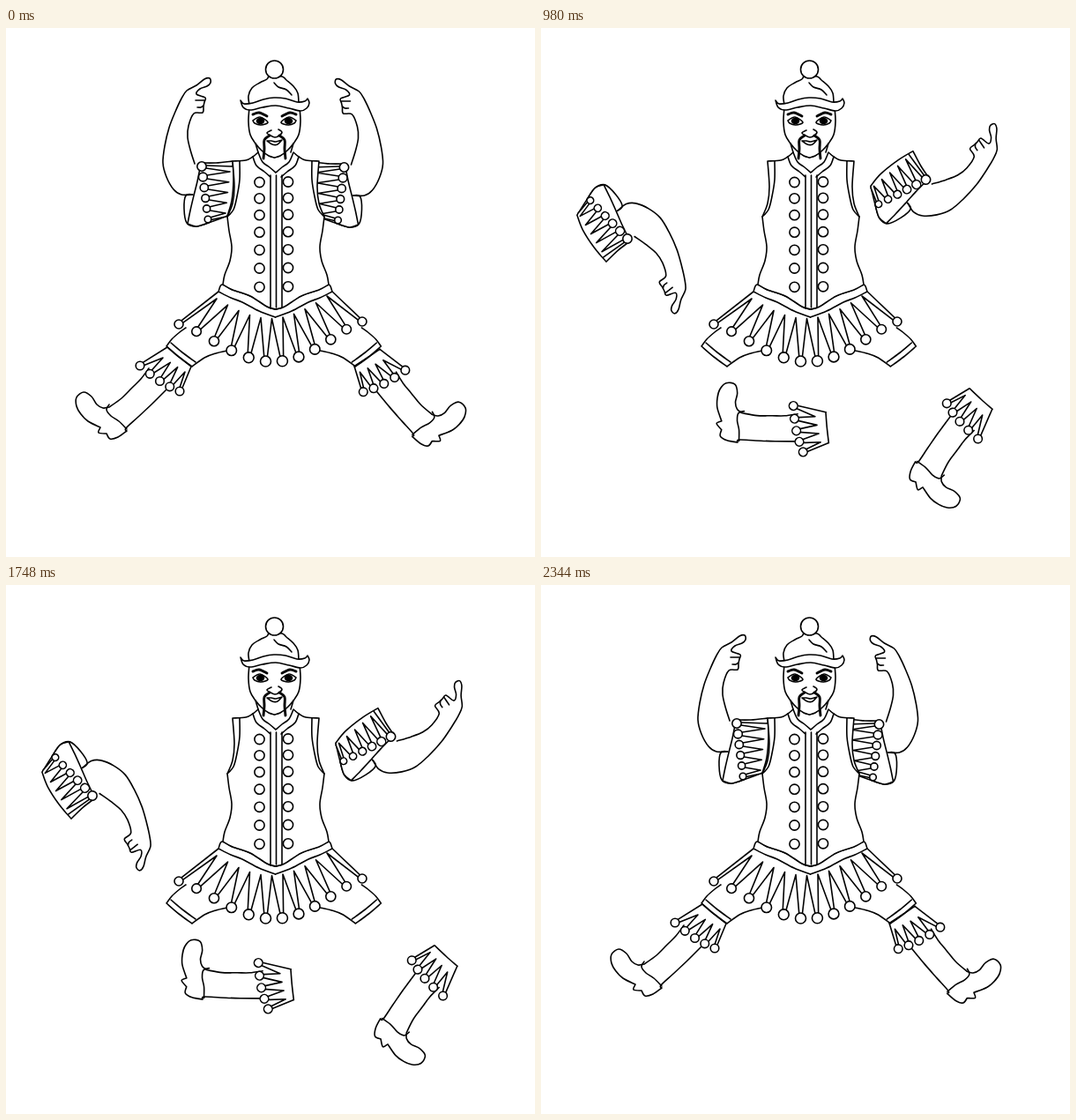
An HTML page that plays this animation: 600x600 px, repeating every 2.4 s.

```html
<!DOCTYPE html>
<html lang="en">
<head>
<meta charset="utf-8">
<title>Jumping jack</title>
<style>
html, body { margin: 0; width: 100%; height: 100%; overflow: hidden; background: #fff; }
svg { display: block; width: 100%; height: 100%; }
g { fill: none; stroke: #000; stroke-width: 1.6; stroke-linecap: round; stroke-linejoin: round; }
.white { fill: #fff; }
.ink { fill: #000; }
.bold { stroke-width: 2.9; }
</style>
</head>
<body>
<svg id="stage" viewBox="0 0 600 600"></svg>
<script>
const LOOP = 2400, APART = 980, TOGETHER = 2260;
const stage = document.getElementById('stage');

function add(parent, tag, attrs = {}) {
  const el = document.createElementNS('http://www.w3.org/2000/svg', tag);
  for (const k in attrs) el.setAttribute(k, attrs[k]);
  parent.appendChild(el);
  return el;
}

const points = s => s.trim().split(/\s+/).map(p => p.split(',').map(Number));

// Smooth path through points; "|" marks a corner.
function curve(text) {
  let d = '', last = null;
  for (const part of text.split('|')) {
    const p = points(part);
    if (last) p.unshift(last);
    else d = 'M' + p[0];
    for (let i = 0; i < p.length - 1; i++) {
      const a = p[i], b = p[i + 1], before = p[i - 1] || a, after = p[i + 2] || b;
      const c1 = a.map((v, k) => v + (b[k] - before[k]) / 6);
      const c2 = b.map((v, k) => v - (after[k] - a[k]) / 6);
      d += `C${c1} ${c2} ${b}`;
    }
    last = p[p.length - 1];
  }
  return d;
}

const line = (g, text, cls = '') => add(g, 'path', { d: curve(text), class: cls });
const ball = (g, cx, cy, r) => add(g, 'circle', { cx, cy, r, class: 'white' });

// Draws a half twice, the second time flipped about x = axis.
function mirror(g, axis, draw) {
  draw(add(g, 'g'));
  draw(add(g, 'g', { transform: `translate(${2 * axis}) scale(-1,1)` }));
}

// Row from a to b that hangs down by sag in the middle.
const row = (a, b, sag = 0, power = 1) => t => [
  a[0] + (b[0] - a[0]) * t,
  a[1] + (b[1] - a[1]) * t + sag * Math.sin(Math.PI * t) ** power
];

// Zigzag of tapered strips, each ending in a ball.
function fringe(g, count, start, stop, ends, peaks, size) {
  const tips = [];
  let d = 'M' + start, top = start;
  for (let i = 0; i < count; i++) {
    const [x, y] = ends(i / (count - 1));
    const next = i < count - 1 ? peaks(i / (count - 2)) : stop;
    const side = p => {
      const dx = p[0] - x, dy = p[1] - y, n = Math.hypot(dx, dy);
      return [dy / n * 1.3, -dx / n * 1.3];
    };
    const [ax, ay] = side(top), [bx, by] = side(next);
    d += `L${x + ax} ${y + ay}L${x - bx} ${y - by}L${next}`;
    tips.push([x, y, size(i / (count - 1))]);
    top = next;
  }
  add(g, 'path', { d, class: 'white' });
  tips.forEach(p => ball(g, ...p));
}

function arm(g) {
  line(g, '211,189 199,189 190,183 182,169 178,153 180,134 185,113 192,95 199,80 205,71 216,65 225,58 231,57 232,62 228,66 220,69 216,75 226,79 225,84 224,89 223,96 213,97 207,111 206,124 209,138 214,154', 'white');
  line(g, '215,82 220,82 225,82');
  line(g, '217,90 221,90 224,88');
  line(g, '212,189 204,190 202,205 205,221 216,225 232,220');
  line(g, '221,153 238,153 257,151|258,172 256,196 251,213|232,220 216,225 206,222|209,207 213,190 217,174 221,154', 'white');
  fringe(g, 6, [257, 157], [249, 214], row([222, 157], [229, 217]),
    row([254, 163], [249, 210]), t => 5.2 - 1.4 * t);
}

function leg(g) {
  line(g, '162,386 153,398 143,408 131,420 117,430|110,431 103,427 97,418 88,413 80,419 80,429 85,438 93,446 107,453|105,459 114,460|118,466 127,464 137,457|136,454 150,441 166,426 185,407');
  line(g, '117,427 114,433 119,440 128,446 137,455');
  fringe(g, 5, [183, 362], [210, 384], row([152, 383], [197, 412], 3),
    row([178, 374], [203, 390]), () => 4.8);
  line(g, '183,362 196,373 210,384');
}

function thigh(g) {
  line(g, '204,340 197,345 188,353 182,361|196,373 211,384|225,374 238,369 251,366');
  line(g, '187,357 200,368 215,379');
}

function skirt(g) {
  fringe(g, 12, [241, 299], [368, 297], t => {
    const [x, y] = row([196, 336], [404, 333], 44, 1.3)(t);
    return [x + 4 * Math.sin(Math.PI * t), y];
  }, row([239, 307], [364, 304], 24), t => 5 + Math.sin(Math.PI * t));
  mirror(g, 305.5, h => line(h, '305.5,328 287,321 268,311 255,306 241,299|245,291 257,297 277,304 296,316 305.5,319', 'white'));
}

function vest(g) {
  mirror(g, 306, h => {
    line(h, '306,164 299,158 291,152 286,141|280,146 272,150 257,151|259,180 257,199 251,214|253,230 256,248 254,264 248,280 246,291|257,297 277,304 296,316 306,319', 'white');
    line(h, '265,151 265,172 262,191 258,206 251,214');
    line(h, '280,146 284,156 293,163 300,169');
  });
  for (let x = 300; x <= 313; x += 6.5) line(g, `${x},167 ${x},317`);
  for (let i = 0; i < 7; i++) {
    const y = 175 + 18 * i + .3 * i * i;
    ball(g, 287.5, y, 5.6);
    ball(g, 320, y - .5, 5.6);
  }
}

function head(g) {
  mirror(g, 304.5, h => {
    line(h, '304.5,147 298,145 290,139 283,131 277,121 275,106 276,90', 'white');
    line(h, '283,131 286,141');
    line(h, '280,98 287,96 296,100', 'bold');
    line(h, '280,105 288,101 297,107 289,110 282,108 280,105');
    add(h, 'ellipse', { cx: 288.5, cy: 105.5, rx: 4, ry: 3, class: 'ink' });
    line(h, '299,122 293,127 293,137 292,148', 'bold');
  });
  line(g, '301,116 296,119 300,122 305,124 310,122 313,118 309,115');
  line(g, '296,128 301,128 306,129 313,127|308,132 302,132 296,128');
}

function hat(g) {
  line(g, '276,87 275,77 279,68 288,62 296,58 298,54|313,55 318,59 326,66 331,74 332,86', 'white');
  line(g, '304,62 309,67 318,70 324,76');
  line(g, '266,82 270,86 280,85 292,81 304,79 317,80 330,84 339,83 342,80|344,85 341,91 334,94 321,91 306,88 291,90 277,93 269,90 266,82', 'white');
  ball(g, 304.5, 47, 10);
}

// Places a limb by its pivot: position, angle, and side (-1 is flipped).
const pose = (pivot, x, y, turn, side) =>
  `translate(${x},${y}) rotate(${turn}) scale(${side},1) translate(${-pivot[0]},${-pivot[1]})`;

function limb(draw, pivot, side, home, away) {
  const el = add(stage, 'g');
  draw(el);
  return { el, home: pose(pivot, ...home, side), away: pose(pivot, ...away, side) };
}

const shoulder = [222, 157], knee = [196, 373];
const limbs = [
  limb(leg, knee, 1, [196, 373, 0], [324.3, 452.8, 45.3]),
  limb(leg, knee, -1, [410, 374, 5.5], [499, 421, 81.5]),
  limb(arm, shoulder, 1, [222, 157, 0], [98, 239, 142.5]),
  limb(arm, shoulder, -1, [383.5, 158, 0], [436.5, 172, 56])
];

const body = add(stage, 'g');
mirror(body, 303.7, thigh);
[skirt, vest, head, hat].forEach(draw => draw(body));

const origin = performance.now();

function tick(now) {
  const t = Math.max(0, now - origin) % LOOP;
  const state = t >= APART && t < TOGETHER ? 'away' : 'home';
  for (const part of limbs) part.el.setAttribute('transform', part[state]);
  requestAnimationFrame(tick);
}
tick(origin);
</script>
</body>
</html>
```
